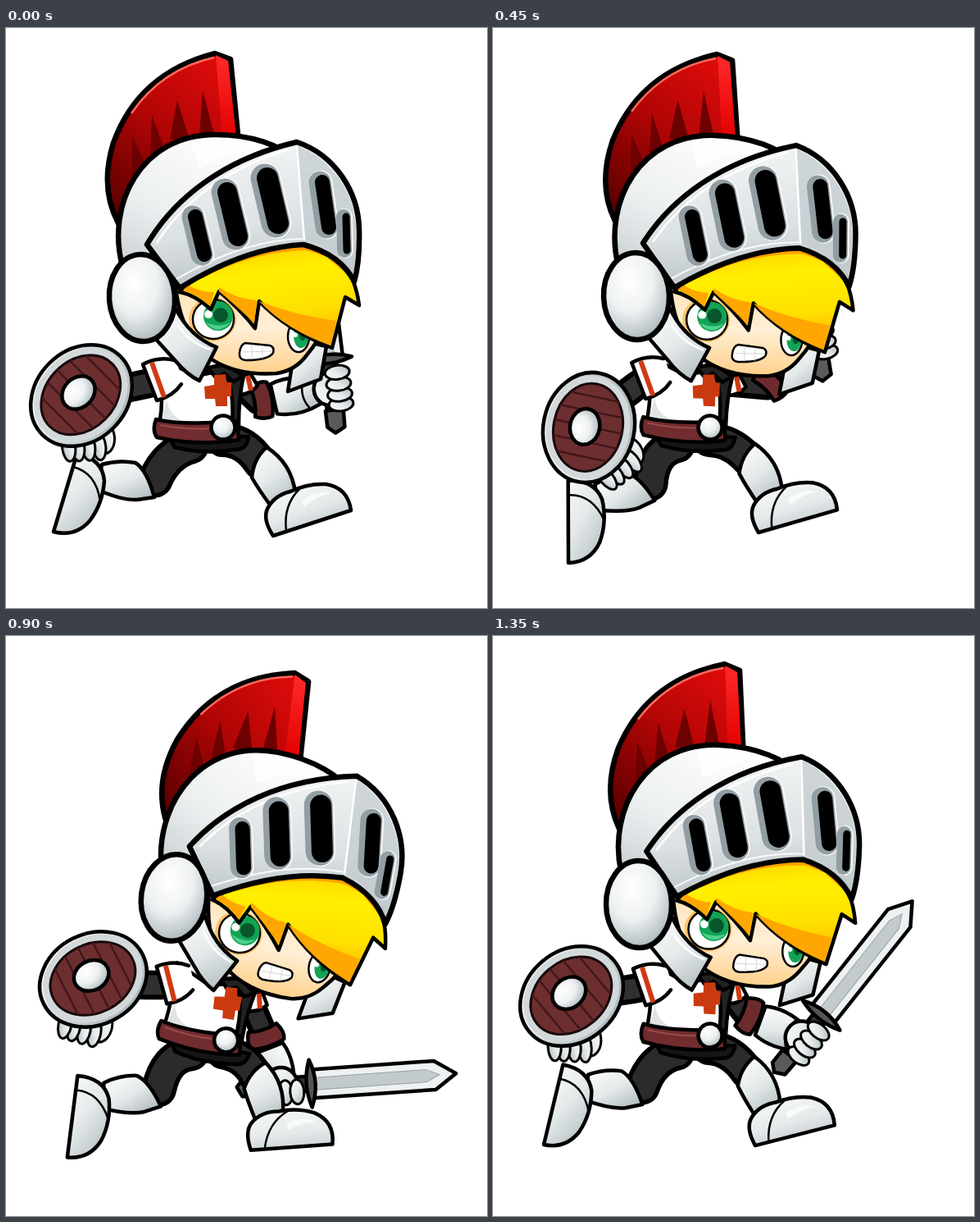
An HTML page for the animation above (1500 ms loop, 587x707 px).

```html
<!DOCTYPE html>
<html lang="en">
<head>
<meta charset="utf-8">
<title>Running knight</title>
<style>
html, body { margin: 0; width: 100%; height: 100%; overflow: hidden; background: #fff; }
svg { display: block; width: 100vw; height: 100vh; }
.o { stroke: #000; stroke-width: 4.5; stroke-linejoin: round; stroke-linecap: round; }
.h { stroke: #000; stroke-width: 6.5; stroke-linejoin: round; }
.l { fill: none; stroke: #000; stroke-width: 2.5; stroke-linecap: round; }
.steel { fill: url(#steel); }
.limb { fill: none; stroke-linecap: round; stroke-linejoin: round; }
.slot { fill: none; stroke-linecap: round; }
.red { fill: none; stroke: #cf3a12; stroke-width: 6; }
</style>
</head>
<body>
<svg viewBox="0 0 587 707">
<defs>
  <linearGradient id="steel" x1=".2" y1="0" x2=".8" y2="1">
    <stop offset="0" stop-color="#fbfcfc"/><stop offset=".5" stop-color="#e4e9ea"/><stop offset="1" stop-color="#b3bdc0"/>
  </linearGradient>
  <linearGradient id="dome" x1=".7" y1="0" x2=".2" y2="1">
    <stop offset="0" stop-color="#fff"/><stop offset=".55" stop-color="#eceff0"/><stop offset="1" stop-color="#c2cacd"/>
  </linearGradient>
  <linearGradient id="visor" x1=".3" y1="0" x2=".5" y2="1">
    <stop offset="0" stop-color="#f5f7f7"/><stop offset=".6" stop-color="#dce1e3"/><stop offset="1" stop-color="#b9c2c5"/>
  </linearGradient>
  <linearGradient id="crest" x1=".8" y1="0" x2=".2" y2="1">
    <stop offset="0" stop-color="#e00b0b"/><stop offset=".5" stop-color="#b00505"/><stop offset="1" stop-color="#5c0000"/>
  </linearGradient>
  <linearGradient id="edge" x1="0" y1="0" x2="0" y2="1">
    <stop offset="0" stop-color="#ff2a2a"/><stop offset="1" stop-color="#e30000"/>
  </linearGradient>
  <linearGradient id="hair" x1=".4" y1="0" x2=".6" y2="1">
    <stop offset="0" stop-color="#ffc400"/><stop offset=".35" stop-color="#fff000"/><stop offset=".7" stop-color="#ffe000"/><stop offset="1" stop-color="#ffab00"/>
  </linearGradient>
  <linearGradient id="skin" x1="0" y1="0" x2="0" y2="1">
    <stop offset="0" stop-color="#ffd596"/><stop offset=".65" stop-color="#ffefd6"/><stop offset="1" stop-color="#ffd08a"/>
  </linearGradient>
  <radialGradient id="ball" cx=".4" cy=".32" r=".72">
    <stop offset="0" stop-color="#fff"/><stop offset=".5" stop-color="#eef1f2"/><stop offset="1" stop-color="#a9b5b9"/>
  </radialGradient>
  <clipPath id="plank"><ellipse cy="-1" rx="54" ry="42"/></clipPath>
</defs>

<g id="farArm">
  <g id="sword">
    <path class="o" fill="#eef1f2" d="M0-17H150L176 0 150 18H0Z"/>
    <path fill="#c3cacd" stroke="#98a3a6" d="M4-7H140L156 0 140 8H4Z"/>
    <path class="o" fill="#333" d="M-4-9H-66V9H-4Z"/>
    <path class="o" fill="#5a5a5a" stroke-width="3" d="M-64-11L-84-11-92-2-86 10-64 11Z"/>
    <path class="o" fill="#555" d="M-2-29Q10 0-2 29-12 0-2-29Z"/>
  </g>
  <path id="farOut" class="limb" stroke="#000" stroke-width="33"/>
  <path id="farIn" class="limb" stroke="#2c2c2c" stroke-width="20"/>
  <g id="forearm">
    <path class="o steel" d="M18-18Q42-26 72-15L74 16Q46 27 20 19Z"/>
    <path class="l" d="M58-16Q50 2 60 18"/>
    <path class="o" fill="#6e2b2d" d="M-7-18Q6-25 14-21 20 0 14 21 4 24-7 18-2 0-7-18Z"/>
  </g>
  <g id="fist">
    <circle class="o steel" cx="-38" cy="-2" r="20"/>
    <g id="fingers"></g>
  </g>
</g>

<path id="thighOutA" class="limb" stroke="#000" stroke-width="42"/>
<path id="thighInA" class="limb" stroke="#2b2b2b" stroke-width="31"/>
<g id="frontLeg">
  <path class="o steel" d="M318 511Q348 530 353 566L322 581Q308 562 300 548 302 525 318 511Z"/>
  <path class="o steel" d="M326 619Q313 599 319 586 327 570 347 565 368 555 390 556 417 560 421 588Z"/>
  <path class="l" d="M342 613Q338 582 358 562"/>
  <path fill="#fff" opacity=".7" d="M360 577Q378 562 396 567 380 570 364 584Z"/>
</g>
<path id="thighOutB" class="limb" stroke="#000" stroke-width="43"/>
<path id="thighInB" class="limb" stroke="#2b2b2b" stroke-width="32"/>
<g id="backLeg">
  <path class="o steel" d="M181 572Q172 539 158 530 138 526 117 532L112 563Q142 576 160 575Z"/>
  <path class="o steel" d="M87 518Q118 526 120 552 118 580 102 601 84 621 58 614Z"/>
  <path class="l" d="M82 535Q110 542 115 577"/>
</g>

<path id="nearOut" class="limb" stroke="#000" stroke-width="36"/>
<path id="nearIn" class="limb" stroke="#303030" stroke-width="24"/>
<g id="body">
  <path fill="#151515" class="o" d="M198 498H296Q294 514 280 514 240 520 206 511Z"/>
  <path fill="#fff" class="o" d="M268 416L300 424 307 436Q297 448 282 447Z"/>
  <path class="red" d="M295 424L299 442"/>
  <path fill="#222" class="o" d="M245 416L268 408 290 424Q284 450 284 484H266Z"/>
  <path fill="#fff" class="o" d="M190 404L232 424 262 418Q279 428 276 484H187Q191 462 190 440Z"/>
  <path fill="#dfe4e5" d="M196 452Q198 475 225 482H190Z"/>
  <path fill="#222" class="o" stroke-width="3" d="M246 414L268 410 290 424 278 431 266 421 256 426Z"/>
  <path fill="#c93a10" d="M254 423L268 422 269 432 275 432 275 449 270 449 270 461 256 461 255 452 243 452 242 437 254 435Z"/>
  <path fill="#702c2e" class="o" d="M183 477Q215 485 282 479L284 502Q235 510 184 499Q178 490 183 477Z"/>
  <path fill="none" stroke="#9a4a4a" stroke-width="2" d="M188 484Q220 490 248 488"/>
  <circle class="o" fill="url(#ball)" cx="265" cy="487" r="14.5"/>
  <g id="sleeve">
    <path fill="#fff" d="M167 410Q186 400 208 406L216 432Q206 449 184 454Z"/>
    <path class="o" fill="none" d="M214 434Q204 449 184 454L167 410Q186 400 206 405"/>
    <path class="red" d="M178 408L193 450"/>
  </g>
</g>

<g id="shield">
  <g id="grip" transform="rotate(128)"></g>
  <ellipse class="o" fill="url(#ball)" rx="67.5" ry="55.5"/>
  <ellipse cy="-1" rx="63" ry="51" fill="#d3d9db"/>
  <ellipse cy="-1" rx="54" ry="42" fill="#6d2e30" stroke="#16090a" stroke-width="3"/>
  <path clip-path="url(#plank)" stroke="#421719" stroke-width="2.5" fill="none" d="M-36-50V50M-18-50V50M1-50V50M20-50V50M38-50V50"/>
  <ellipse cy="-5" rx="22" ry="18" class="o" stroke-width="3" fill="url(#ball)"/>
</g>

<g id="head">
  <path class="o steel" d="M344 443L384 428 391 388 365 382 349 411Z"/>
  <path class="h" fill="url(#crest)" d="M137 238Q114 195 131 140 162 55 255 31L274 38 284 140 200 190Z"/>
  <path fill="url(#edge)" d="M256 33L271 40 281 133H264Z"/>
  <path fill="none" stroke="#ff6a5c" stroke-width="2.5" d="M153 104Q190 50 254 36"/>
  <path fill="#6d0000" d="M240 76L254 130H236ZM209 88L224 136H200ZM178 106L194 150 176 160ZM154 132L170 166 154 180Z"/>
  <path class="h" fill="url(#dome)" d="M142 290C122 215 165 130 255 130 300 130 335 143 352 160L250 310 180 330Z"/>
  <path fill="#fff" opacity=".8" d="M226 139Q262 132 308 143 270 150 236 172Z"/>
  <path class="o" fill="url(#skin)" d="M207 315Q212 365 240 396 275 425 330 421 352 418 366 400 400 360 412 290L300 260Z"/>
  <ellipse cx="252" cy="355" rx="29" ry="27" fill="#ffc46b"/>
  <ellipse cx="253" cy="355" rx="25" ry="24" fill="#fff" stroke="#000" stroke-width="2.5"/>
  <circle cx="259" cy="351" r="18" fill="#12a355"/>
  <path fill="#4fd08c" d="M244 359Q258 376 274 359 260 366 244 359Z"/>
  <circle cx="262" cy="350" r="9" fill="#07562c"/>
  <circle cx="247" cy="349" r="5" fill="#fff"/>
  <ellipse cx="357" cy="376" rx="13" ry="19" fill="#fff" stroke="#000" stroke-width="2.5"/>
  <ellipse cx="360" cy="376" rx="9" ry="14" fill="#12a355"/>
  <ellipse cx="362" cy="374" rx="4" ry="7" fill="#07562c"/>
  <circle cx="353" cy="374" r="3" fill="#fff"/>
  <path fill="#fff" stroke="#000" stroke-width="2.5" d="M292 384L322 387Q328 389 326 396 320 405 292 405 284 404 285 396 286 386 292 384Z"/>
  <path fill="none" stroke="#d5d5d5" d="M289 395L324 394M300 386V404M313 387V403"/>
  <path class="o" fill="url(#hair)" d="M212 322Q230 325 250 343L260 321Q285 342 304 366L309 333Q342 368 398 390L414 328 431 338Q426 300 405 280L365 250 250 285Z"/>
  <path fill="#ffa600" d="M309 333Q342 368 396 387L403 357Q352 350 309 333ZM260 321Q285 342 303 360L306 332Q280 330 260 316ZM216 320Q232 324 249 339L254 322Q236 322 222 313Z"/>
  <path fill="#ffa000" d="M240 305Q300 273 365 271 400 278 416 300L365 258 250 290Z"/>
  <path class="h" fill="url(#visor)" d="M172 264C205 208 265 160 355 139 402 155 430 200 431 245Q432 285 425 309 408 276 363 264 290 268 212 317Z"/>
  <path fill="#c4ccd0" opacity=".75" d="M355 143C398 160 426 202 427 245Q428 278 424 298 408 270 366 259Z"/>
  <path fill="none" stroke="#fff" stroke-width="2.5" d="M355 144L364 259M184 262Q235 182 345 148"/>
  <path fill="none" stroke="#f8fafa" stroke-width="2" d="M208 306Q290 258 362 257"/>
  <g id="slots"></g>
  <path class="o steel" d="M178 374L208 407Q220 422 236 430L257 389Q225 377 207 342Z"/>
  <path fill="none" stroke="#fff" stroke-width="2.5" d="M210 362Q224 384 250 392"/>
  <ellipse class="h" fill="url(#ball)" cx="166" cy="329" rx="40" ry="53" transform="rotate(-4 166 329)"/>
</g>
</svg>
<script>
const $ = id => document.getElementById(id);
const STEP = 150;

// Each slot is a key pose index; fractions blend two neighbours.
const timeline = [0, 0.8, 1, 2, 3, 4, 4.4, 5, 5.5, 6];

// Key poses: x, y of the pivot and rotation in degrees.
const head = [[165,329,0], [151,334,-5], [174,327,1.8], [196,320,9.2], [208,318,13], [198,320,9.4], [177,327,3]];
const body = [[265,487,0], [263,484,-4], [265,487,2], [268,491,8], [269,494,11], [268,491,8], [265,487,3]];
const shield = [[92,448,-45], [142,518,-118], [117,487,-78], [107,444,-46], [108,420,-30], [104,416,-22], [96,439,-40]];
const backLeg = [[58,614,0], [100,658,-20.5], [92,652,-17], [84,644,-14], [80,641,-12], [67,627,-6], [62,620,-3.3]];
const frontLeg = [[325,619,0], [342,603,-9], [323,615,2], [304,625,10], [293,627,16.5], [305,626,10], [319,621,3.8]];
const sword = [[393,402,-97], [249,327,-178], [385,340,-102], [413,485,-38], [372,549,-2], [376,540,-7], [402,461,-51.5]];
const elbow = [[308,455], [300,392], [335,437], [325,469], [315,486], [315,482], [309,461]];
const sleeve = [[0], [-36], [-2], [-3], [-5], [-3], [-1]];

const pivots = { head: [165,329], body: [265,487], shield: [0,0], backLeg: [58,614], frontLeg: [325,619], sword: [0,0] };

function blend(keys, k) {
  const i = Math.floor(k), a = keys[i], b = keys[i + 1] || a;
  return a.map((v, n) => v + (b[n] - v) * (k - i));
}

function point([x, y, r], [px, py], [qx, qy]) {
  const a = r * Math.PI / 180, c = Math.cos(a), s = Math.sin(a);
  const dx = qx - px, dy = qy - py;
  return [x + dx * c - dy * s, y + dx * s + dy * c];
}

function place(id, [x, y, r], [px, py] = [0, 0]) {
  $(id).setAttribute('transform', `translate(${x} ${y}) rotate(${r}) translate(${-px} ${-py})`);
}

function limb(ids, a, bend, b) {
  for (const id of ids) $(id).setAttribute('d', `M${a}Q${bend} ${b}`);
}

function draw(k) {
  const p = {};
  for (const [id, keys] of Object.entries({ head, body, shield, backLeg, frontLeg, sword })) {
    p[id] = blend(keys, k);
    place(id, p[id], pivots[id]);
  }
  place('fist', p.sword);
  $('sleeve').setAttribute('transform', `rotate(${blend(sleeve, k)[0]} 206 424)`);

  const on = (id, q) => point(p[id], pivots[id], q);
  limb(['thighOutA', 'thighInA'], on('body', [264, 502]), on('body', [292, 502]), on('frontLeg', [310, 530]));
  limb(['thighOutB', 'thighInB'], on('body', [226, 510]), on('body', [196, 518]), on('backLeg', [182, 551]));

  const near = on('body', [192, 428]);
  limb(['nearOut', 'nearIn'], near, [near[0] - 22, near[1] + 8], p.shield.slice(0, 2));

  const e = blend(elbow, k), shoulder = on('body', [284, 432]), hand = on('sword', [-38, 0]);
  limb(['farOut', 'farIn'], shoulder, shoulder, e);
  place('forearm', [...e, Math.atan2(hand[1] - e[1], hand[0] - e[0]) * 180 / Math.PI]);
}

const ellipse = (x, y, rx, ry) =>
  `<ellipse class="o steel" style="stroke-width:3" cx="${x}" cy="${y}" rx="${rx}" ry="${ry}"/>`;
$('fingers').innerHTML = [-58, -46, -33, -19].map(x => ellipse(x, 9, 8.5, 15)).join('');
$('grip').innerHTML = ellipse(54, -20, 20, 14) + [-14, -1, 12, 23].map((y, i) => ellipse(64 - i, y, 17, 8)).join('');

// Slots: top x, y, bottom x, y, width.
$('slots').innerHTML = [
  [229,230,240,276,18], [268,200,281,254,24], [317,183,330,238,26], [384,188,392,243,18], [413,230,414,271,9]
].map(([x, y, u, v, w]) => {
  const line = (dx, width, color) =>
    `<path class="slot" stroke="${color}" stroke-width="${width}" d="M${x + dx} ${y}L${u + dx} ${v}"/>`;
  return line(0, w + 11, '#f7f9f9') + line(-1, w + 9, '#929ea3') + line(2, w, '#000');
}).join('');

let shown = -1;
function tick(now) {
  const i = Math.floor(now / STEP) % timeline.length;
  if (i !== shown) draw(timeline[shown = i]);
  requestAnimationFrame(tick);
}
draw(timeline[0]);
requestAnimationFrame(tick);
</script>
</body>
</html>
```
